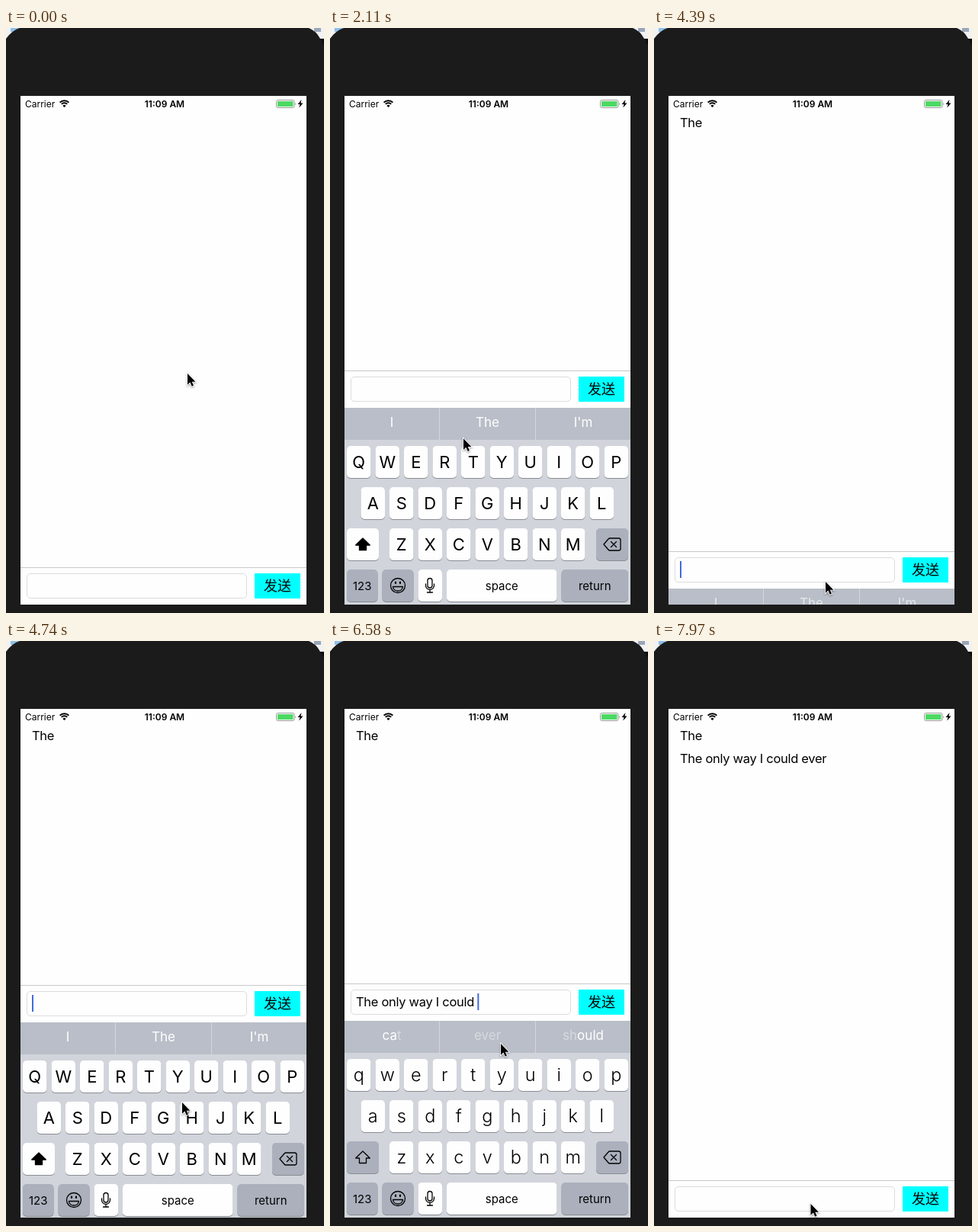
Recreate the animation shown at these times as an HTML page. Size 417 by 767 pixels, loop 8 s.

```html
<!DOCTYPE html>
<html lang="en">
<head>
<meta charset="utf-8">
<title>Chat input</title>
<style>
html, body { margin: 0; width: 100%; height: 100%; overflow: hidden; background: #1b1b1b; }
svg { display: block; width: 100%; height: 100%; }
text { font-family: Inter, "Noto Sans CJK SC", "Noto Sans CJK", sans-serif; white-space: pre; }
.mid text, text.mid { text-anchor: middle; }
.msg { font-size: 16.5px; letter-spacing: -.3px; }
.sug { font-size: 17px; fill: #fff; }
.label { font-size: 15px; }
.icon { fill: none; stroke: #000; stroke-width: 1.3; stroke-linejoin: round; stroke-linecap: round; }
</style>
</head>
<body>
<svg viewBox="0 0 417 767">
  <defs><clipPath id="screen"><path d="M19 89h375v667H19z"/></clipPath></defs>
  <path fill="#f2f2f2" d="M0 0h417v14H0z"/>
  <path fill="#8fc0e8" d="M6 0h11v5H6z"/>
  <path fill="#9aa6b8" d="M404 0h9v5h-9z"/>
  <path fill="#0c0c0c" d="M405 14h12v12z"/>
  <path fill="#1b1b1b" d="M0 14Q8 3 18 0H397Q407 4 412 14L417 22V767H0z"/>
  <path fill="#fefefe" d="M19 89h375v667H19z"/>

  <text x="25" y="104" font-size="12">Carrier</text>
  <path fill="none" stroke="#000" stroke-width="2" d="M70.6 97.6a8.3 8.3 0 0 1 11.8 0M72.8 99.8a5.2 5.2 0 0 1 7.4 0"/>
  <path d="M76.5 104l-2.1-2.1a3 3 0 0 1 4.2 0z"/>
  <text class="mid" x="208" y="104" font-size="12" font-weight="600">11:09 AM</text>
  <rect x="354.5" y="94.5" width="23.5" height="10" rx="2" fill="none" stroke="#999"/>
  <rect x="356" y="96" width="20.5" height="7" rx=".5" fill="#4cd964"/>
  <path fill="#999" d="M379.3 97.5q1.7 2 0 4z"/>
  <path d="M387.5 94l-5 6h3l-1.2 4.5 5.2-6h-3z"/>

  <text id="msg1" class="msg" x="34" y="130">The</text>
  <text id="msg2" class="msg" x="34" y="160">The only way I could ever</text>

  <g clip-path="url(#screen)"><g id="panel">
    <path fill="#fefefe" d="M19 449h375v49H19z"/>
    <path fill="#c9c9cc" d="M19 449h375v1H19z"/>
    <rect x="27.5" y="457.5" width="288" height="32" rx="4.5" fill="#fefefe" stroke="#dcdcdc"/>
    <text id="input" class="msg" x="34" y="479"></text>
    <rect id="caret" y="462" width="2" height="22" fill="#426bdc"/>
    <path fill="#0ff" d="M326 457h60v33h-60z"/>
    <text class="mid" x="356" y="480" font-size="18">发送</text>
    <path fill="#d1d4db" d="M19 498h375v258H19z"/>
    <path fill="#b9bec8" d="M19 498h375v42H19z"/>
    <path fill="#d3d6dc" d="M143 498h1v42h-1zM269 498h1v42h-1z"/>
    <g id="sugs" class="mid"></g>
    <g id="keys" class="mid"></g>
    <path id="shift" d="M43 669l9.3 9h-4.8v6.5h-9V678h-4.800z" stroke="#000" stroke-width="1.3" stroke-linejoin="round"/>
    <g class="icon">
      <path d="M359 677l6-7q.8-1 2-1h11.500q2.500 0 2.500 2.500v11q0 2.500-2.500 2.500H367q-1.200 0-2-1zM368.500 673.500l7 7m0-7l-7 7"/>
      <circle cx="89" cy="731" r="9.500"/>
      <path d="M82.500 732.500h13q-.8 5.500-6.500 5.500t-6.500-5.500z"/>
      <path stroke-width="2.200" d="M86 726.500v1.500m6-1.500v1.500"/>
      <rect x="128" y="721.500" width="6" height="12.500" rx="3"/>
      <path d="M125.500 729v2a5.500 5.500 0 0 0 11 0v-2M131 736.500v3.500m-3.500 0h7"/>
    </g>
  </g></g>

  <path id="cursor" d="M0 0V14.800L3.400 11.600 5.700 16.800 8 15.800 5.800 10.700H10.400z" stroke="#fff" stroke-width="1.800"
    paint-order="stroke" style="filter:drop-shadow(0 1px 1px #0006)"/>
</svg>
<script>
const $ = id => document.getElementById(id);
const LOOP = 8000;

// Bursts of screen updates: start, end, number of updates
const bursts = [
  [60, 820, 14], [880, 1000, 3], [1410, 2160, 13], [2220, 2450, 4], [2620, 3370, 14],
  [3460, 4160, 11], [4390, 5100, 13], [5270, 5780, 10], [5950, 6700, 13], [6760, 7100, 7], [7270, 7970, 11]
];
// Time, typed text, suggestions
const states = [
  [0, "", "||"],
  [1680, "", "I|The|I'm"],
  [2620, "The ", "new|only|first"],
  [3274, "", "new|only|first"],
  [4300, "", "I|The|I'm"],
  [5260, "The ", "new|only|first"],
  [5600, "The only ", "one|way|thing"],
  [5950, "The only way ", "to|I|is"],
  [6240, "The only way I ", "can|could|would"],
  [6515, "The only way I could ", "cat|ever|should"],
  [6690, "The only way I could ever ", "be|get|have"],
  [7210, "", "be|get|have"]
];
// Pointer: time, x, y
const path = [
  [0, 238, 453], [350, 268, 369], [820, 165, 711], [1000, 161.5, 729], [1500, 161.5, 729],
  [2110, 175, 538], [2450, 195, 526], [2640, 195, 526], [3200, 342, 466], [3460, 342, 466],
  [4160, 225, 726], [4480, 225, 726], [4745, 231, 605], [5100, 212, 526], [5950, 212, 526],
  [6500, 224, 528], [6700, 224, 528], [7100, 350, 480], [7270, 350, 480], [7970, 205.500, 738]
];
const shows = [1278, 4364], hides = [3274, 7210];

const letters = [];
let html = "";
function key(x, y, w, color = "#fefefe", label = "", id = "") {
  html += `<rect x="${x}" y="${y + 1}" width="${w}" height="42" rx="5" fill="#898c92"/>
    <rect id="${id}" x="${x}" y="${y}" width="${w}" height="42" rx="5" fill="${color}"/>`;
  if (label) html += `<text class="label" x="${x + w / 2}" y="${y + 26.500}">${label}</text>`;
}
[["QWERTYUIOP", 22, 548], ["ASDFGHJKL", 40.500, 602], ["ZXCVBNM", 78, 656]].forEach(([row, x0, y]) =>
  [...row].forEach((c, i) => {
    const x = x0 + 37.500 * i;
    key(x, y, 31.500);
    html += `<text class="letter" x="${x + 15.750}" y="${y + 29}">${c}</text>`;
  }));
const GRAY = "#abb0bc";
key(22, 656, 42, GRAY, "", "shiftKey");
key(349, 656, 42, GRAY);
key(22, 710, 40.500, GRAY, "123");
key(68.500, 710, 41, GRAY);
key(115.500, 710, 31.500);
key(153, 710, 144.500, "#fefefe", "space");
key(303.500, 710, 87.500, GRAY, "return");
$("keys").innerHTML = html;
const caps = [...document.querySelectorAll(".letter")];

const smooth = p => p * p * (3 - 2 * p);

function spring(ms) {
  const x = Math.max(0, ms) * .01826;
  return 1 - (1 + x) * Math.exp(-x);
}

function snap(t) {
  const b = bursts.findLast(b => t >= b[0]);
  if (!b) return 0;
  const [start, end, n] = b, step = (end - start) / (n - 1);
  return Math.min(end, start + Math.floor((t - start) / step + .15) * step);
}

function pointer(t) {
  const i = path.findIndex(p => p[0] > t);
  if (i < 0) return path.at(-1).slice(1);
  const [a, b] = [path[i - 1], path[i]], p = smooth((t - a[0]) / (b[0] - a[0]));
  return [1, 2].map(k => a[k] + (b[k] - a[k]) * p);
}

// Letters already in the previous word stay, new ones fade in
function suggestion(word, old, x, fade) {
  const spans = [...word].map(c =>
    `<tspan fill-opacity="${old.includes(c) ? 1 : fade}">${c}</tspan>`).join("");
  return `<text class="sug" x="${x}" y="523">${spans}</text>`;
}

function setCase(upper) {
  for (const cap of caps) {
    const c = cap.textContent;
    cap.textContent = upper ? c.toUpperCase() : c.toLowerCase();
    cap.setAttribute("font-size", upper ? 22 : 23.500);
    cap.setAttribute("font-weight", upper ? 400 : 300);
  }
  $("shiftKey").setAttribute("fill", upper ? "#fefefe" : GRAY);
  $("shift").setAttribute("fill", upper ? "#000" : "none");
}

function draw(now) {
  const t = snap(now % LOOP);
  const total = list => list.reduce((sum, s) => sum + spring(t - s), 0);
  const drop = Math.round(258 * (1 - total(shows) + total(hides)));
  $("panel").setAttribute("transform", `translate(0 ${drop})`);

  const i = states.findLastIndex(s => t >= s[0]);
  const [since, text, words] = states[i];
  const old = states[Math.max(0, i - 1)][2].split("|");
  const fade = Math.min(1, (t - since) / 140);
  $("sugs").innerHTML = words.split("|").map((w, k) =>
    suggestion(w, old[k], [81, 206.500, 332][k], fade)).join("");
  setCase(words == "||" || words.startsWith("I|"));

  $("input").textContent = text;
  const focus = shows.findLast(s => t >= s);
  const active = focus && !hides.some(h => h > focus && t >= h);
  const blinkStart = text ? since : focus;
  $("caret").setAttribute("x", 34 + (text ? $("input").getComputedTextLength() : 0));
  $("caret").setAttribute("opacity", active && (t - blinkStart) % 1000 < 600 ? 1 : 0);

  hides.forEach((h, k) => $("msg" + (k + 1)).setAttribute("opacity", t >= h ? 1 : 0));
  $("cursor").setAttribute("transform", `translate(${pointer(t)})`);
}

const begin = performance.now();
function frame() {
  draw(performance.now() - begin);
  requestAnimationFrame(frame);
}
frame();
</script>
</body>
</html>
```
